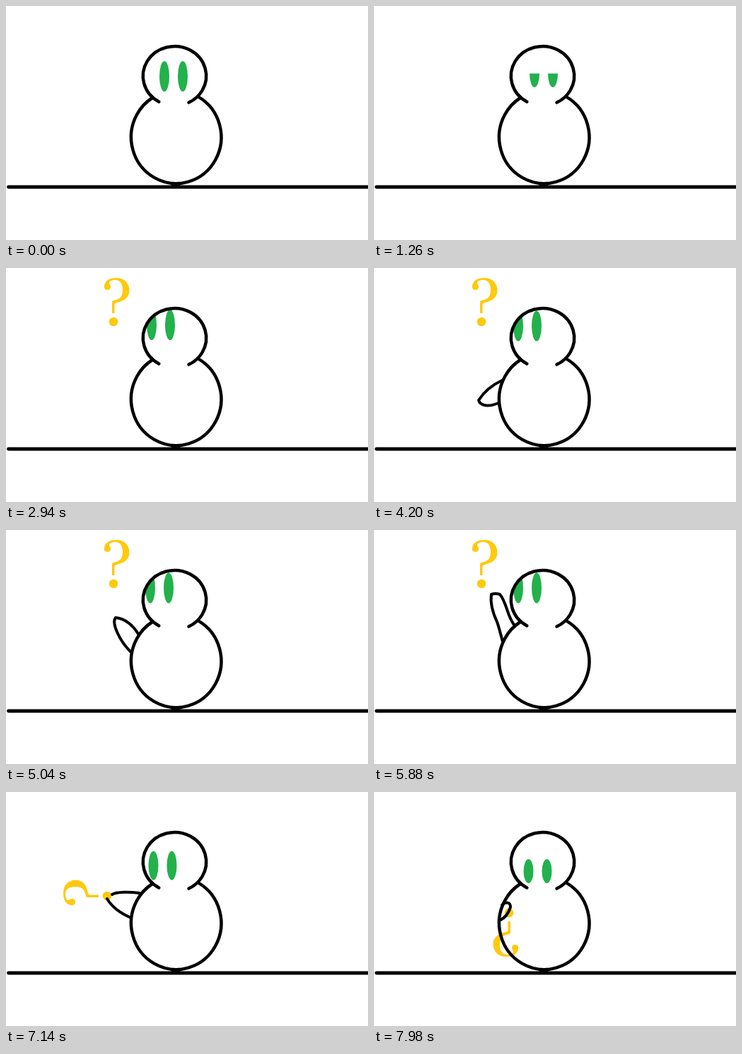
Animation of 512x331 px, one loop 8000 ms. Source, as an HTML page with a canvas:

```html
<!DOCTYPE html>
<html lang="en">
<head>
<meta charset="utf-8">
<title>Question</title>
<style>
html, body { margin: 0; width: 100%; height: 100%; overflow: hidden; background: #fff; }
canvas { display: block; width: 512px; height: 331px; }
</style>
</head>
<body>
<canvas id="stage" width="512" height="331"></canvas>
<script>
const ctx = document.getElementById("stage").getContext("2d");
const LOOP = 8000, STEP = 420, EYE_GAP = 26;
const GREEN = "#22b14c", GOLD = "#ffc90e";

// Question mark, with its dot centred on the origin
const hook = new Path2D(
  "M-13-51C-12-59-4-62 4-62C16-62 22.5-54 22.5-44C22.5-34 14-29.500 8-28" +
  "C3-27 1.500-26 1.500-24V-12H-2V-28C-2-30 1-30 4-31C10-33 13-37 13-45" +
  "C13-54 9-59 3-59C-3-59-6-57-6-55C-6-53-4-52-4-50C-4-46-6-45-8.500-45C-12-45-14-48-13-51Z");

const open = (x, y, ry = 21.5) => ({ kind: "open", x, y, ry });
const half = (x, y, ry) => ({ kind: "half", x, y, ry });
const shut = (x, y) => ({ kind: "shut", x, y });
const mark = (x, y, turn = 0) => ({ x, y, turn });

const arms = {
  low: "M181 159C166 166 155 176 148 187C150 195 162 197 176 191",
  out: "M181 158C166 154 153 153 144 158C143 169 157 184 176 188",
  lift: "M187 147C180 135 168 125 155 124C149 131 160 157 178 174",
  rise: "M192 140C186 119 176 105 160 104C152 109 163 140 179 167",
  up: "M182 158C180 151 177 138 174 130C168 117 164 105 166 91Q172 89 178 91C188 103 188 121 198 134",
  pull: "M195 135C184 122 169 113 156 116C153 128 166 151 179 170",
  hold: "M189 143C175 141 156 141 150 145M143 151C150 163 163 172 177 178",
  drop: "M187 145C171 143 151 147 144 154M140 162C148 175 163 180 177 183",
  tuck: "M181 160C186 155 193 155 193 163C190 172 185 178 179 181"
};
for (const name in arms) arms[name] = new Path2D(arms[name]);

const aside = open(204, 82), ahead = mark(152, 76);
const poses = [
  [open(224, 99.5)],
  [half(226, 96, 23)],
  [shut(238.5, 93)],
  [half(227, 95.5, 19.5)],
  [open(226, 100.5)],
  [open(226, 100.5), ahead],
  [open(216, 98.5), ahead],
  [open(206, 80.5), ahead],
  [half(205, 80, 23), ahead],
  [shut(217.5, 82), ahead],
  [aside, ahead, "low"],
  [aside, ahead, "out"],
  [aside, ahead, "lift"],
  [aside, ahead, "rise"],
  [aside, ahead, "up"],
  [aside, mark(164, 92), "up"],
  [open(224, 100), mark(153, 112), "pull"],
  [open(208.5, 104, 20.5), mark(143, 147, -90), "hold"],
  [open(208.5, 104, 20.5), mark(138, 157, -115), "drop"],
  [open(218.5, 112, 17), mark(191, 171, -180), "tuck"]
];

function line(width, path) {
  ctx.lineWidth = width;
  ctx.stroke(path);
}

function oval(x, y, rx, ry, from, to) {
  const p = new Path2D();
  p.ellipse(x, y, rx, ry, 0, from, to);
  return p;
}

const head = oval(238.5, 99, 44.7, 42, 2.09, 7.39);
const body = oval(240.7, 185.5, 63.7, 65.5, -1.06, 4.16);
const skull = oval(238.5, 99, 45, 43, 0, 7);
const ground = new Path2D("M3.500 256H520M236 253H244");

function drawEyes({ kind, x, y, ry }) {
  ctx.save();
  ctx.fillStyle = ctx.strokeStyle = GREEN;
  if (kind === "shut") {
    line(5, new Path2D(`M${x - 27} ${y}h19M${x + 8} ${y}h19`));
  } else {
    ctx.clip(skull);
    const end = kind === "half" ? Math.PI : Math.PI * 2;
    for (const dx of [0, EYE_GAP]) ctx.fill(oval(x + dx, y, 7, ry, 0, end));
  }
  ctx.restore();
}

function drawMark({ x, y, turn }) {
  ctx.save();
  ctx.translate(x, y);
  ctx.rotate(turn * Math.PI / 180);
  ctx.fillStyle = GOLD;
  ctx.fill(hook);
  ctx.fill(oval(0, 0, 6.3, 6.3, 0, 7));
  ctx.restore();
}

function draw(now) {
  const [eyes, sign, arm] = poses[Math.floor(now % LOOP / STEP)];
  ctx.fillStyle = "#fff";
  ctx.fillRect(0, 0, 512, 331);
  ctx.strokeStyle = "#000";
  ctx.lineCap = ctx.lineJoin = "round";
  if (eyes.kind !== "shut") drawEyes(eyes);
  if (sign) drawMark(sign);
  line(4.5, head);
  line(4.5, body);
  line(4.8, ground);
  if (arm) line(4, arms[arm]);
  if (eyes.kind === "shut") drawEyes(eyes);
  requestAnimationFrame(tick);
}

const start = performance.now();
function tick() { draw(performance.now() - start); }
tick();
</script>
</body>
</html>
```
